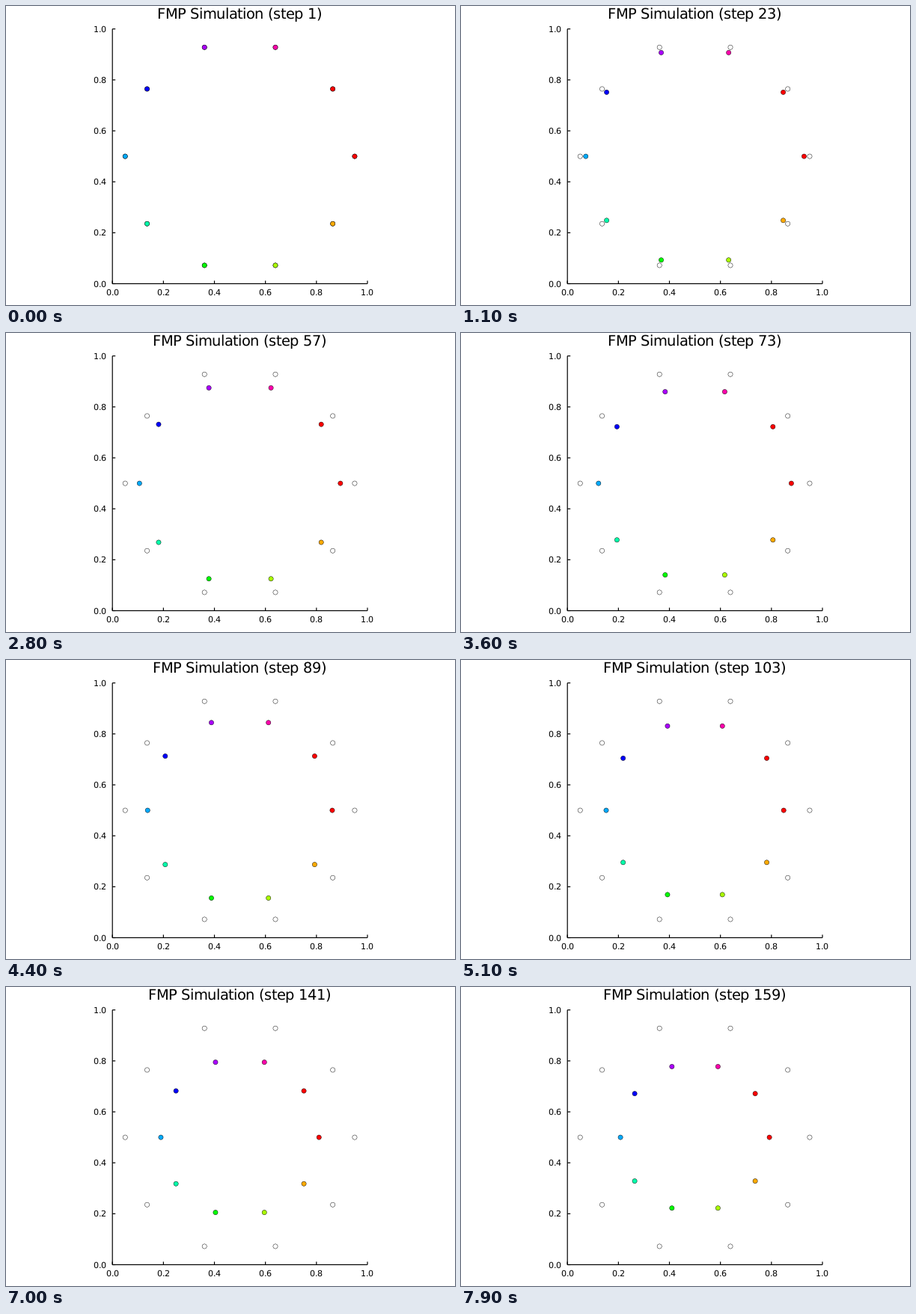
A matplotlib script for the animation above (8000 ms loop, 600 by 400 pixels).

```python
import colorsys
from functools import lru_cache

import numpy as np
import matplotlib.pyplot as plt
from matplotlib.animation import FuncAnimation
from matplotlib.patches import PathPatch
from matplotlib.path import Path
from matplotlib.textpath import TextPath
from matplotlib.transforms import Affine2D

W, H, DPI = 600, 400, 100
PX = 72 / DPI  # points per pixel
LEFT, BOTTOM, SIDE = 142.2, 371.5, 340.8
FRAMES, INTERVAL = 80, 100
AGENTS, START_RADIUS, SPEED = 10, 0.45, 0.001
TITLE_SIZE, TICK_SIZE = 14 / PX, 8 / PX

plt.rcParams.update({"font.family": "DejaVu Sans", "toolbar": "None"})


def to_px(x, y):
    return LEFT + SIDE * x, BOTTOM - SIDE * y


def line(xs, ys):
    ax.plot(xs, ys, color="black", lw=1.2 * PX, solid_capstyle="butt",
            snap=False)


@lru_cache(maxsize=None)
def advance(char, size):
    """Advance of a character, cut to whole pixels."""
    def right(s):
        return TextPath((0, 0), s, size=size).get_extents().x1
    return np.floor(right(f"|{char}|") - right("||"))


def text_path(x, y, text, size, align=0.5):
    """Outline of a text whose ink is aligned at x, with its baseline at y."""
    glyphs, pen = [], 0
    for char in text:
        if char != " ":
            glyphs.append(TextPath((pen, 0), char, size=size))
        pen += advance(char, size)
    start = glyphs[0].get_extents().x0
    end = glyphs[-1].get_extents().x1
    origin = round(x - start - align * (end - start))
    place = Affine2D().scale(1, -1).translate(origin, round(y))
    return place.transform_path(Path.make_compound_path(*glyphs))


def label(*args, **kwargs):
    patch = PathPatch(text_path(*args, **kwargs), fc="black", lw=0, snap=False)
    return ax.add_patch(patch)


def title_path(step):
    return text_path(LEFT + SIDE / 2, 17, f"FMP Simulation (step {step})",
                     TITLE_SIZE)


def ring(radius):
    angles = -2 * np.pi * np.arange(AGENTS) / AGENTS
    return to_px(0.5 + radius * np.cos(angles), 0.5 + radius * np.sin(angles))


def markers(colors, z):
    x, y = ring(START_RADIUS)
    return ax.scatter(x, y, s=(6.2 * PX) ** 2, c=colors, edgecolors="black",
                      linewidths=0.45 * PX, zorder=z, snap=False)


fig = plt.figure(figsize=(W / DPI, H / DPI), dpi=DPI, facecolor="white")
ax = fig.add_axes([0, 0, 1, 1])
ax.set_xlim(0, W)
ax.set_ylim(H, 0)
ax.axis("off")

# Axes with inward ticks
x1, y1 = to_px(1, 1)
line([LEFT, x1], [BOTTOM, BOTTOM])
line([LEFT, LEFT], [BOTTOM, y1])
for v in np.linspace(0, 1, 6):
    x, y = to_px(v, v)
    line([x, x], [BOTTOM, BOTTOM - 4])
    line([LEFT, LEFT + 4], [y, y])
    label(x, 387, f"{v:.1f}", TICK_SIZE)
    label(133.3, y + 4, f"{v:.1f}", TICK_SIZE, align=1)

hues = np.linspace(0, 1, AGENTS)
goals = markers(["white"] * AGENTS, 3)
agents = markers([colorsys.hsv_to_rgb(h, 1, 1) for h in hues], 4)
title = ax.add_patch(PathPatch(title_path(1), fc="black", lw=0, snap=False))


def update(frame):
    step = 2 * frame + 1
    agents.set_offsets(np.column_stack(ring(START_RADIUS - SPEED * (step - 1))))
    title.set_path(title_path(step))
    return agents, title


anim = FuncAnimation(fig, update, frames=FRAMES, interval=INTERVAL,
                     repeat=True, repeat_delay=0)
plt.show()
```
